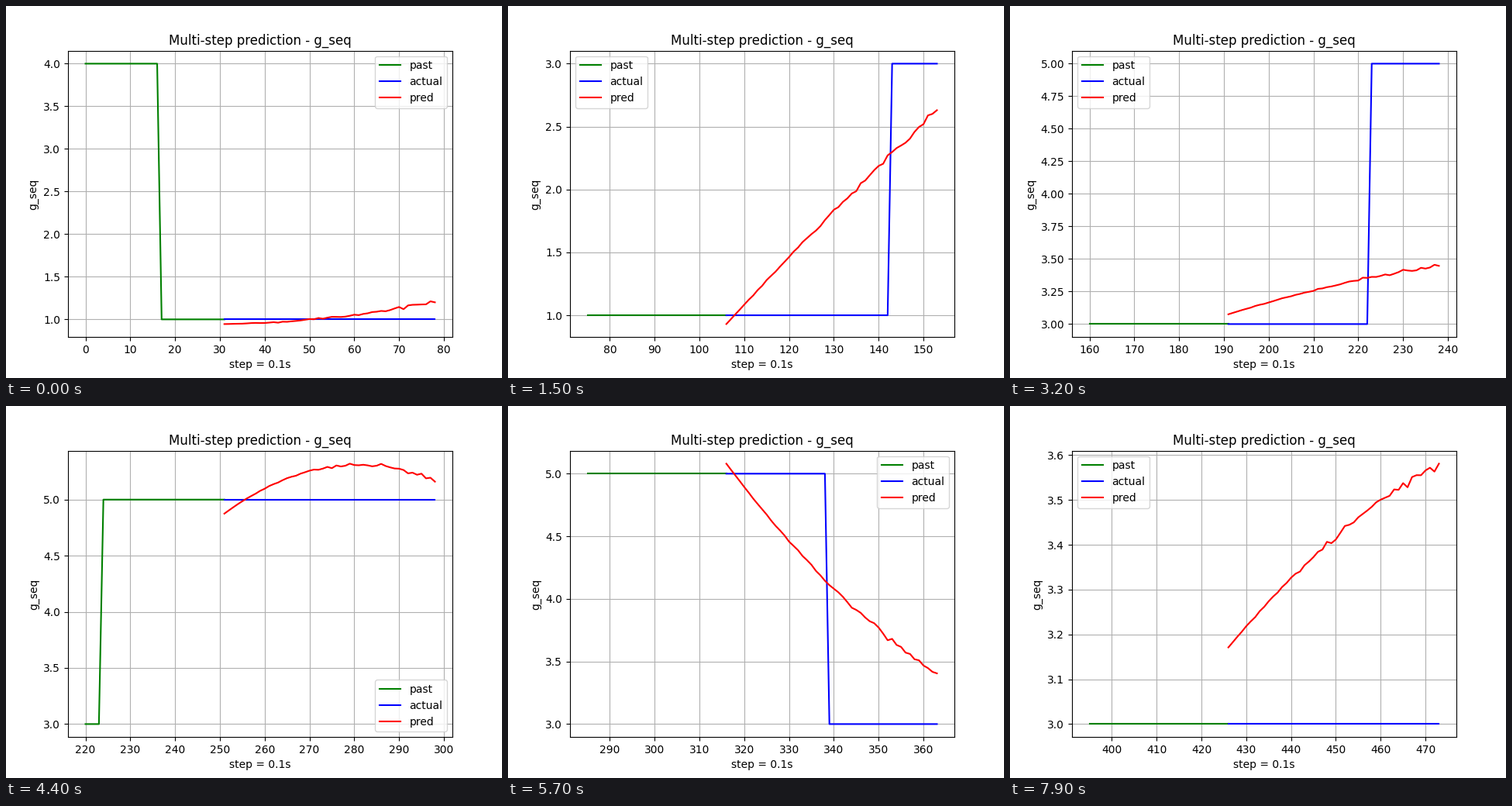
Animation of 640x480 px, one loop 8000 ms. Source, as a matplotlib script:

```python
import numpy as np
import matplotlib.pyplot as plt
from matplotlib.animation import FuncAnimation

FRAMES, INTERVAL = 80, 100
STRIDE, PAST, AHEAD = 5, 32, 48

EDGES = [16, 143, 223, 339]
LEVELS = np.array([4, 1, 3, 5, 3])

# Key poses of the forecast: frame -> (start, middle, end) of a parabola.
POSES = {
    0: (0.945, 1.02, 1.20),
    5: (0.96, 1.06, 1.32),
    15: (0.93, 1.81, 2.63),
    22: (0.92, 1.95, 2.85),
    23: (2.60, 3.20, 3.38),
    32: (3.075, 3.295, 3.447),
    38: (3.08, 3.50, 3.90),
    39: (4.30, 4.90, 5.00),
    44: (4.875, 5.29, 5.16),
    50: (5.03, 5.10, 4.80),
    57: (5.08, 4.10, 3.405),
    61: (5.03, 3.90, 3.20),
    62: (3.40, 3.10, 3.20),
    67: (3.03, 3.255, 3.455),
    79: (3.171, 3.414, 3.581),
}


def level(x):
    return LEVELS[np.searchsorted(EDGES, x, side="right")]


def forecast(n):
    a, m, e = (np.interp(n, list(POSES), c) for c in zip(*POSES.values()))
    u = np.linspace(0, 1, AHEAD)
    curve = a + (4 * m - 3 * a - e) * u + 2 * (a - 2 * m + e) * u**2

    # Noise grows with the horizon; the end point stays on the curve.
    size = 0.007 if level(n * STRIDE + PAST - 2) == 3 else 0.015
    noise = np.random.default_rng(n).normal(0, size, AHEAD)
    return curve + noise * u * (u < 1)


fig, ax = plt.subplots(figsize=(6.4, 4.8), dpi=100)
past, = ax.plot([], [], "g", label="past")
actual, = ax.plot([], [], "b", label="actual")
pred, = ax.plot([], [], "r", label="pred")
ax.set_title("Multi-step prediction - g_seq")
ax.set_xlabel("step = 0.1s")
ax.set_ylabel("g_seq")
ax.grid(True)
ax.legend(loc="best")


def update(n):
    seen = n * STRIDE + np.arange(PAST)
    future = seen[-1] + np.arange(AHEAD)
    past.set_data(seen, level(seen - 1))  # observations lag by one step
    actual.set_data(future, level(future))
    pred.set_data(future, forecast(n))
    ax.relim()
    ax.autoscale_view()
    return past, actual, pred


anim = FuncAnimation(fig, update, frames=FRAMES, interval=INTERVAL,
                     repeat=True, repeat_delay=0, blit=False)
plt.show()
```
